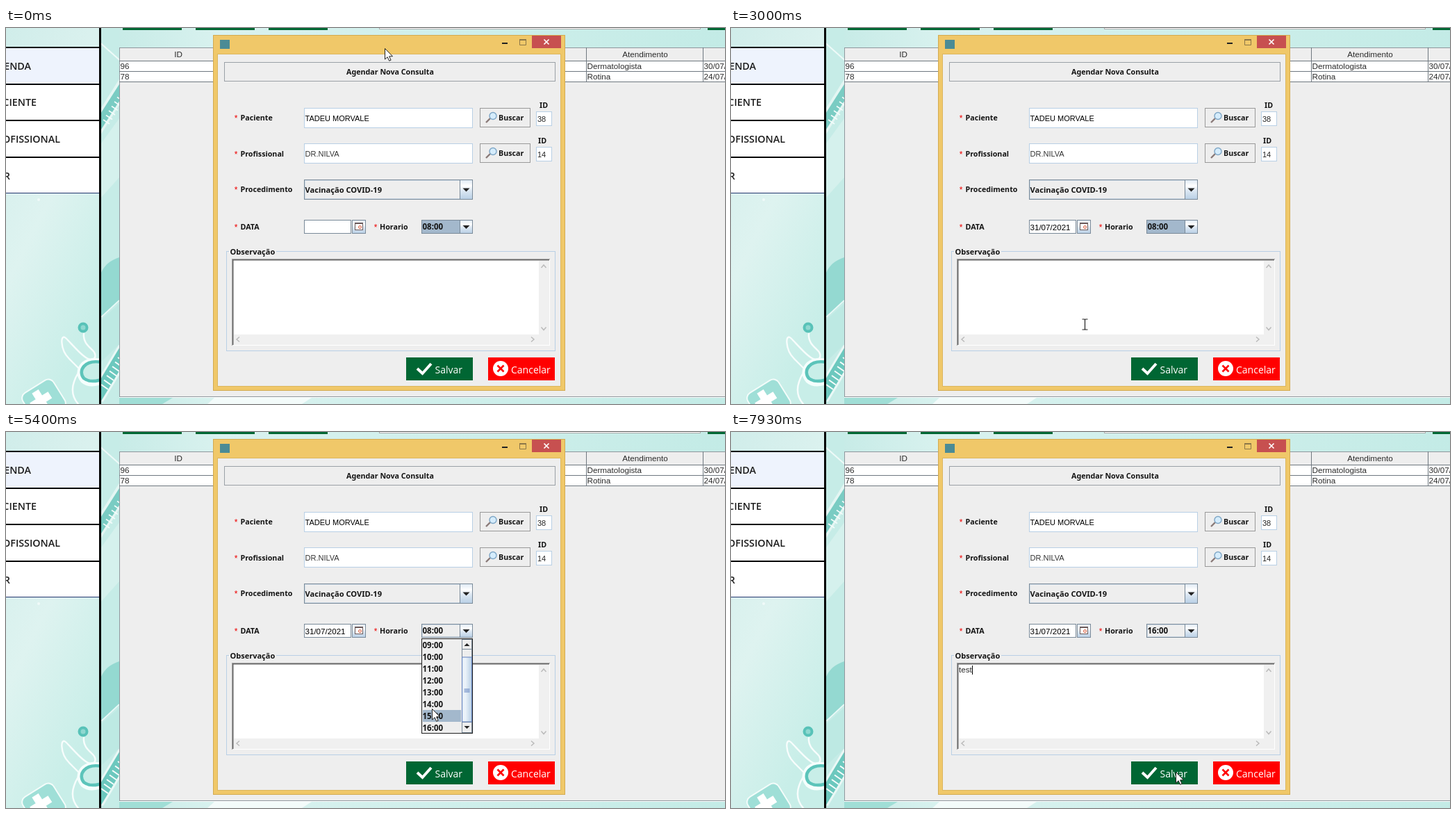
Write an HTML page that moves like this. It is 1035x541 px and loops after 8 s.

```html
<!DOCTYPE html>
<html lang="pt">
<head>
<meta charset="utf-8">
<title>Agendar Nova Consulta</title>
<style>
html, body { margin: 0; width: 100%; height: 100%; overflow: hidden; background: #eee; }
svg { display: block; width: 1035px; height: 541px; }
text { font-family: "Liberation Sans", Arial, sans-serif; font-size: 11.7px; fill: #2b2b2b; white-space: pre; }
.b { font-family: "Noto Sans", "Open Sans", sans-serif; font-weight: 700; font-size: 10.7px; fill: #141414; }
.menu { font-family: "Open Sans", sans-serif; font-weight: 600; font-size: 14.3px; fill: #1c1c1c; }
.big { font-family: "Open Sans", sans-serif; font-size: 14px; fill: #fff; }
.s { font-size: 11px; fill: #222; }
.star { font-size: 12px; fill: #e00; }
</style>
</head>
<body>
<svg id="stage" viewBox="0 0 1035 541">
  <defs>
    <linearGradient id="mint" x1="0" y1="0" x2=".5" y2="1">
      <stop offset="0" stop-color="#d0edea"/><stop offset=".55" stop-color="#def3f0"/><stop offset="1" stop-color="#c8eee8"/>
    </linearGradient>
    <linearGradient id="band">
      <stop offset="0" stop-color="#b4e4de"/><stop offset=".3" stop-color="#d9f2ef"/><stop offset="1" stop-color="#c3ebe6"/>
    </linearGradient>
    <linearGradient id="metal" x1="0" y1="0" x2="0" y2="1">
      <stop offset="0" stop-color="#dde8f3"/><stop offset=".3" stop-color="#fff"/><stop offset=".55" stop-color="#dde8f3"/><stop offset="1" stop-color="#b8cfe5"/>
    </linearGradient>
    <linearGradient id="thumb">
      <stop offset="0" stop-color="#dde8f3"/><stop offset=".3" stop-color="#eef5fb"/><stop offset="1" stop-color="#b8cfe5"/>
    </linearGradient>
    <clipPath id="side"><path d="M0 0H134V541H0Z"/></clipPath>
    <clipPath id="strip"><path d="M137 0H163V541H137Z"/></clipPath>
  </defs>
</svg>
<script>
const stage = document.getElementById('stage');
let layer = stage;

function add(tag, attrs, content) {
  const node = document.createElementNS('http://www.w3.org/2000/svg', tag);
  for (const key in attrs) node.setAttribute(key, attrs[key]);
  if (content !== undefined) node.textContent = content;
  return layer.appendChild(node);
}
function group(attrs, draw) {
  const parent = layer, g = layer = add('g', attrs);
  draw();
  layer = parent;
  return g;
}
const fill = (x, y, width, height, color) => add('rect', { x, y, width, height, fill: color });
const box = (x, y, w, h, color, stroke) =>
  add('rect', { x: x + .5, y: y + .5, width: w - 1, height: h - 1, fill: color, stroke });
const path = (d, color, stroke = 'none', width = 1) =>
  add('path', { d, fill: color, stroke, 'stroke-width': width });
const dot = (cx, cy, r, color, stroke = 'none', width = 1) =>
  add('circle', { cx, cy, r, fill: color, stroke, 'stroke-width': width });
const label = (x, y, str, cls = '', extra = {}) => add('text', { x, y, class: cls, ...extra }, str);
const mid = { 'text-anchor': 'middle' }, end = { 'text-anchor': 'end' };
const down = (x, y, r = 5) => path(`M${x - r} ${y}h${2 * r}l${-r} ${r}z`, '#222');
const up = (x, y, r = 4) => path(`M${x - r} ${y}h${2 * r}l${-r} ${-r}z`, '#222');
const EDGE = '#7a8a99', PALE = '#b8cfe5', PICK = '#a3b8cc';

function backdrop() {
  fill(0, 0, 1035, 541, 'url(#band)');
  fill(0, 0, 135, 541, 'url(#mint)');
  group({ 'clip-path': 'url(#side)' }, () => {
    dot(47, 247, 2, '#f0faf8');
    path('M112 439C110 460 132 462 128 474C121 487 98 458 87 447C78 437 77 462 91 476L106 491', 'none', '#f7fdfc', 2.4);
    dot(111, 431, 5.5, '#8fd8d0', '#58c2b8', 4);
    path('M137 480C112 474 99 493 111 507Q120 515 137 509', 'none', '#f5fffd', 8);
    path('M137 481C113 477 103 493 112 504Q121 511 137 506', 'none', '#5cc4ba', 4.5);
    path('M104 496Q86 526 108 545', 'none', '#f7fdfc', 2.4);
    group({ transform: 'rotate(-32 49 535)' }, () => {
      add('rect', { x: 27, y: 515, width: 52, height: 48, rx: 9, fill: '#9fdfd7', stroke: '#f3fcfa', 'stroke-width': 2 });
      path('M44 521h11v10h10v11h-10v10h-11v-10h-10v-11h10z', '#fff');
    });
  });
  group({ 'clip-path': 'url(#strip)' }, () => {
    fill(137, 0, 26, 541, '#c6ece7');
    path('M134 20L168 50', 'none', '#eefaf8', 2);
    path('M128 148L172 78', 'none', '#e4f6f3', 20);
    path('M130 145L170 82', 'none', '#7accc3', 13);
    for (let i = 0; i < 8; i++) path(`M${140 + i * 4} ${132 - i * 6.5}l9 6`, 'none', '#f4fcfb', 1.6);
    path('M137 166L163 130V215L137 244Z', '#d5f1ed');
    path('M137 352Q144 336 163 330V393L137 417Z', '#94d9d1');
    path('M137 416L163 392', 'none', '#e9f9f7', 2);
    path('M137 420L163 397V455L137 480Z', '#bde9e3');
    path('M130 532L172 462', 'none', '#eaf8f6', 23);
    path('M130 532L172 462', 'none', '#6cc8be', 17);
    for (let i = 0; i < 8; i++) path(`M${137 + i * 4} ${513 - i * 6.5}l10 7`, 'none', '#f7fdfc', 2);
  });
  path('M300 532H440L426 541H290Z', '#f3fbfa');
  path('M163 532H240L225 541H163Z', '#a0ded6');

  fill(0, 28, 134, 210, '#fff');
  fill(0, 29, 134, 51, '#eef3fd');
  ['AGENDA', 'PACIENTE', 'PROFISSIONAL', 'SAIR'].forEach((name, i) => {
    label([36, 44, 78, 6][i], 59.5 + i * 52.7, name, 'menu', end);
    fill(0, 27 + Math.round(i * 52.7), 134, 2, '#000');
  });
  fill(0, 237, 134, 1, '#24366f');
  fill(134, 0, 3, 541, '#000');

  [168, 273, 378, 1010].forEach(x => fill(x, 0, 85, 3, '#063'));
  box(537, -20, 463, 22, '#fff', '#aaa');
  box(163, 28, 880, 503, '#eee', '#8f979d');
  fill(163, 531, 872, 1, '#fff');
  fill(164, 47, 871, 30, '#fff');
  [47, 62, 77].forEach(y => fill(163, y, 872, 1, '#6f7880'));
  [333, 835, 1003].forEach(x => fill(x, 28, 1, 50, '#6f7880'));
  label(248, 42, 'ID', '', mid);
  label(920, 42, 'Atendimento', '', mid);
  [['96', 'Dermatologista', '30/07/2021'], ['78', 'Rotina', '24/07/2021']].forEach((row, r) =>
    row.forEach((str, c) => label([164.5, 836.5, 1004.5][c], 58.7 + r * 15, str)));
}

function combo(x, y, w, h) {
  box(x, y, w, h, '#eee', EDGE);
  box(x + 1, y + 1, w - 2, h - 2, 'none', '#cfdbe6');
  const button = box(x + w - 19, y, 19, h, 'url(#metal)', EDGE);
  down(x + w - 9.5, y + h / 2 - 2);
  return button;
}

function searchRow(y, name, color, id, idX) {
  box(429, y, 243, 29, '#fff', PALE);
  label(430.5, y + 18.5, name, 's', { style: `fill:${color}` });
  box(682, y, 73, 28, '#eee', '#999');
  path(`M697 ${y + 15}l-6 6`, 'none', '#8a7a78', 2.4);
  dot(701, y + 11.5, 5, '#d5ecfb', '#7ea6c6', 1.4);
  label(709, y + 18, 'Buscar', 'b');
  label(idX, y - .5, 'ID', 'b');
  box(763, y + 5, 23, 21, '#fff', PALE);
  label(765, y + 20, id, 's');
}

function dialog() {
  box(298, 10, 507, 512, '#f0c869', '#d3aa50');
  box(304, 37, 495, 479, '#eee', '#dcb65e');
  fill(308, 17, 14, 13, '#4b8b95');
  fill(714, 21, 8, 2, '#222');
  path('M739.5 17V24.5H748.5V17Z', 'none', '#8c7748');
  fill(739, 16, 10, 2, '#8c7748');
  fill(757, 11, 42, 18, '#c75050');
  path('M774.5 16.5l7 7m0-7l-7 7', 'none', '#fff', 1.7);

  box(314, 49, 477, 28, '#eee', '#9aa0a6');
  label(553, 67, 'Agendar Nova Consulta', 'b', mid);
  [['Paciente', 133], ['Profissional', 185], ['Procedimento', 236], ['DATA', 289.5]].forEach(([str, y]) => {
    label(328.7, y + 1, '*', 'star');
    label(337.5, y, str, 'b');
  });
  label(529.7, 291, '*', 'star');
  label(538, 290, 'Horario', 'b');
  searchRow(115, 'TADEU MORVALE', '#000', '38', 768);
  searchRow(166, 'DR.NILVA', '#333', '14', 766);

  combo(429, 218, 243, 29);
  label(430.5, 237, 'Vacinação COVID-19', 'b', { style: 'font-size:11.1px' });
  box(429, 276, 68, 20, '#fff', EDGE);

  box(317, 321, 474, 144, 'none', PALE);
  fill(321, 316, 68, 10, '#eee');
  label(322.5, 326, 'Observação', 'b', { style: 'font-size:11px' });
  fill(325, 332, 458, 125, '#fff');
  fill(325, 332, 458, 1, '#a0a0a0');
  fill(325, 332, 1, 125, '#a0a0a0');
  fill(326, 333, 456, 1.5, '#696969');
  fill(326, 333, 1.5, 123, '#696969');
  fill(767, 335, 15, 121, '#f0f0f0');
  fill(328, 441, 454, 15, '#f0f0f0');
  path('M770.5 345l3.5-4 3.5 4M770.5 430.5l3.5 4 3.5-4M336 444.5l-4 3.5 4 3.5M756 444.5l4 3.5-4 3.5', 'none', '#bbb', 1.5);

  fill(576, 474, 96, 33, '#063');
  path('M592 490l7.5 7L612 483', 'none', '#fff', 4);
  label(617.5, 497, 'Salvar', 'big');
  fill(694, 474, 96, 33, '#f00');
  dot(712, 490, 11, '#fff');
  path('M707.5 485.5l9 9m0-9l-9 9', 'none', '#f00', 2.6);
  label(727, 497, 'Cancelar', 'big');
}

function spinner(x) {
  box(x, 299, 15, 10, '#eee', PALE);
  box(x, 308, 15, 10, '#eee', PALE);
  up(x + 7.5, 305, 2);
  down(x + 7.5, 312, 2);
}

function calendar() {
  box(328, 297, 191, 162, '#eee', '#6382bf');
  combo(329, 299, 80, 19);
  label(330.5, 312, 'julho', 'b');
  spinner(409);
  box(424, 299, 79, 19, '#fff', PALE);
  label(500.5, 313, '2021', 's', { ...end, style: 'font-size:11.7px' });
  spinner(502);
  fill(329, 318, 189, 20, '#d2e4ee');
  fill(329, 338, 17, 100, '#d2e4ee');
  ['dom', 'seg', 'ter', 'qua', 'qui', 'sex', 'sáb'].forEach((day, i) =>
    label(357.5 + i * 24.5, 332, day, 's', { ...mid, style: `fill:${i ? '#0d5fb4' : '#c00'}` }));
  for (let w = 0; w < 5; w++) label(331, 352.5 + w * 19.8, 27 + w, 's', { style: 'fill:#5c7c92' });
  for (let d = 1; d <= 31; d++) {
    const slot = d + 3, today = d === 29;
    const x = Math.round(346 + slot % 7 * 24.5), y = Math.round(338.5 + Math.floor(slot / 7) * 19.8);
    box(x, y, 24, 19, today ? '#a0a0a0' : 'url(#metal)', today ? '#8d8d8d' : EDGE);
    label(x + 12, y + 14, d, 's', { ...mid, style: today ? 'fill:#c00' : '' });
  }
}

function hours() {
  box(598, 297, 74, 137, '#eee', '#222');
  ui.hover = fill(600, 298, 55, 17, PICK);
  ui.items = Array.from({ length: 8 }, (_, i) => label(599.5, 311 + i * 17, '', 'b', { style: 'font-size:11.5px' }));
  box(656, 298, 15, 135, '#eee', EDGE);
  box(656, 298, 15, 15, '#eee', EDGE);
  box(656, 417, 15, 16, '#eee', EDGE);
  up(663.5, 308);
  down(663.5, 423, 4);
  ui.thumb = group({}, () => {
    box(656, 313, 15, 94, 'url(#thumb)', '#6382bf');
    path('M659.5 359.5h8m-8 2h8m-8 2h8', 'none', '#6382bf');
  });
}

const ui = {};
backdrop();
dialog();
ui.date = label(430.5, 290.5, '31/07/2021', 's', { style: 'font-size:11.6px;fill:#000' });
ui.pick = box(498, 276, 20, 20, 'url(#metal)', EDGE);
box(502, 281, 12, 10, '#fff', '#6b5a5a');
fill(502, 280, 12, 2, '#6b5a5a');
dot(509.5, 286.5, 2, '#fbe5dc', '#d8583c');
ui.arrow = combo(598, 276, 74, 20);
ui.focus = fill(599, 277, 54, 18, PICK);
ui.hour = label(599.5, 290, '', 'b', { style: 'font-size:11.5px' });
ui.note = label(328, 346, '');
ui.caret = fill(0, 336, 1, 13, '#000');
ui.calendar = group({}, calendar);
ui.hours = group({}, hours);
ui.pointer = group({}, () => path('M0 0V15.5L3.6 12.2 6.2 17.8 8.6 16.7 6.1 11.3H11Z', '#fff', '#222'));
ui.beam = group({}, () => path('M-4-7.5h3q1 0 1 1q0-1 1-1h3M0-6.5v13M-4 7.5h3q1 0 1-1q0 1 1 1h3', 'none', '#222', 1.2));

// time, x, y of the pointer
const moves = [
  [0, 545, 29], [400, 545, 29], [600, 580, 80], [800, 640, 180], [930, 647, 240], [1070, 600, 290],
  [1130, 570, 294], [1200, 537, 283], [1460, 511, 283], [1600, 511, 283], [1670, 508, 283], [1800, 508, 283],
  [2070, 490, 370], [2260, 476, 443], [2400, 476, 443], [2470, 488, 438], [2600, 488, 438], [2800, 509, 426],
  [3270, 509, 426], [3530, 600, 350], [3730, 719, 283], [3800, 719, 283], [4070, 664, 295], [4330, 664, 295],
  [4600, 669, 330], [4930, 640, 385], [5200, 613, 398], [5400, 613, 398], [5670, 620, 420], [6070, 620, 420],
  [6330, 550, 357], [7000, 550, 357], [7130, 679, 457], [7470, 679, 457], [7870, 640, 489], [8000, 640, 489]
];

function pointerAt(t) {
  const i = moves.findIndex(m => m[0] > t);
  const [t0, x0, y0] = moves[i - 1], [t1, x1, y1] = moves[i];
  const k = (t - t0) / (t1 - t0);
  return [x0 + (x1 - x0) * k, y0 + (y1 - y0) * k].map(Math.round);
}
const show = (node, on) => node.setAttribute('visibility', on ? 'visible' : 'hidden');
const clock = h => String(h).padStart(2, '0') + ':00';

function render(now) {
  const t = Math.floor((now % 8000 + 4) * .015) % 120 / .015;
  const during = (a, b) => t >= a && t < b;
  const [x, y] = pointerAt(t);
  const calOpen = during(1660, 2999), listOpen = during(4130, 5799);

  show(ui.calendar, calOpen);
  show(ui.date, t >= 2999);
  const hot = during(1330, 1860);
  ui.pick.setAttribute('fill', hot ? PICK : 'url(#metal)');
  ui.pick.setAttribute('stroke', hot ? '#54708c' : EDGE);

  show(ui.focus, !calOpen && !listOpen && t < 6330);
  ui.hour.textContent = clock(t < 5799 ? 8 : 16);
  ui.arrow.setAttribute('fill', during(4130, 4199) ? PICK : 'url(#metal)');
  show(ui.hours, listOpen);
  const scrolled = t >= 4860 ? 1 : 0;
  ui.items.forEach((item, i) => { item.textContent = clock(8 + scrolled + i); });
  ui.thumb.setAttribute('transform', `translate(0 ${scrolled * 10.5})`);
  const row = x < 656 ? Math.max(0, Math.min(7, Math.floor((y - 296) / 17))) : 0;
  ui.hover.setAttribute('y', 298 + row * 17);

  const typed = t < 7260 ? 0 : Math.min(4, 1 + Math.floor((t - 7260) / 133));
  ui.note.textContent = 'test'.slice(0, typed);
  ui.caret.setAttribute('x', 328 + (typed ? Math.round(ui.note.getComputedTextLength()) : 0));
  show(ui.caret, t >= 6330 && (typed || (t - 6330) % 1000 < 500));

  const beam = !calOpen && !listOpen && x > 327 && x < 767 && y > 335 && y < 441;
  show(ui.beam, beam);
  show(ui.pointer, !beam);
  const place = `translate(${x + .5} ${y + .5})`;
  ui.pointer.setAttribute('transform', place);
  ui.beam.setAttribute('transform', place);
}

function tick() {
  render(performance.now());
  requestAnimationFrame(tick);
}
tick();
</script>
</body>
</html>
```
